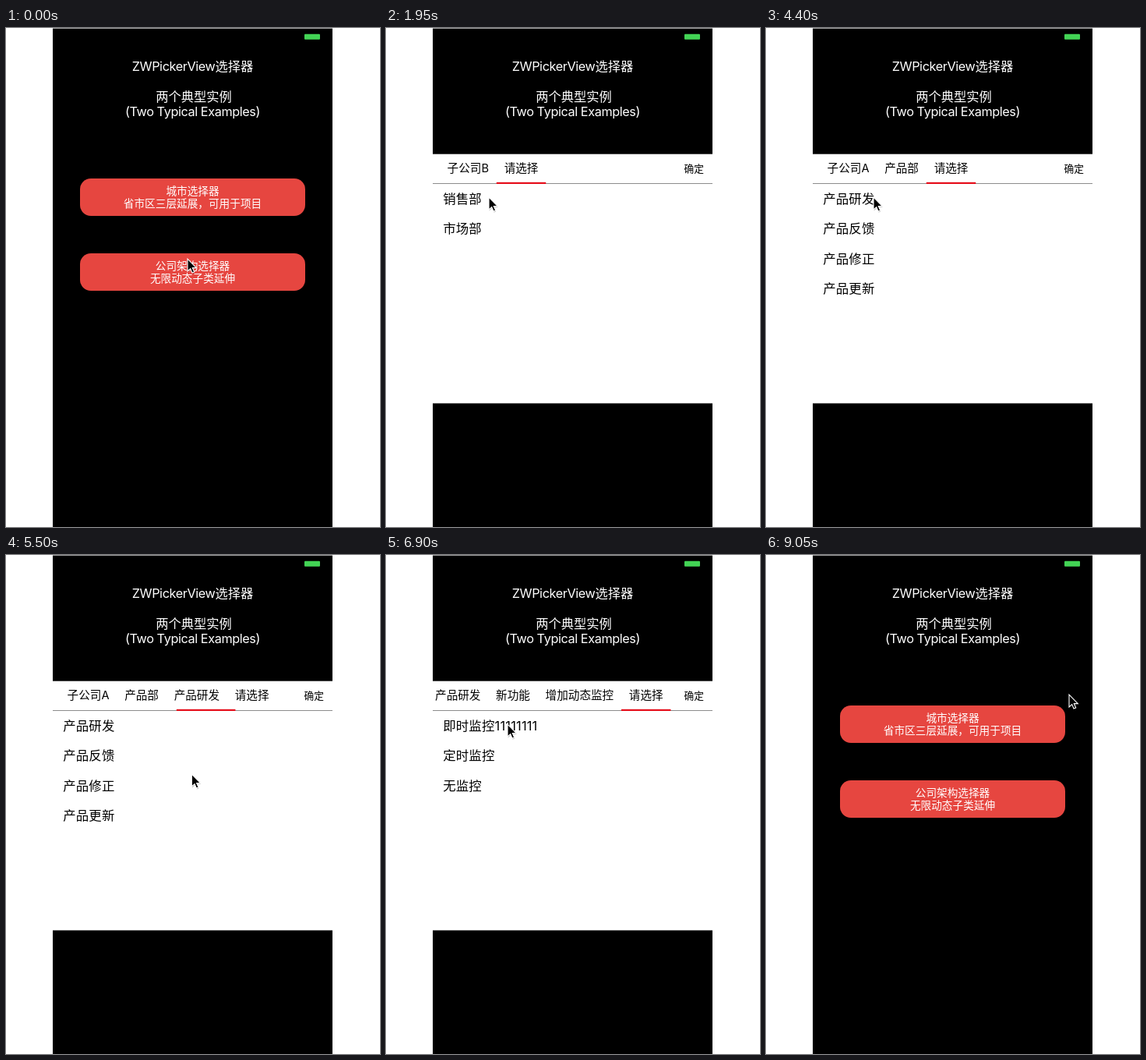
Recreate the animation shown at these times as an HTML page. Size 480x640 px, loop 9.1 s.

```html
<!DOCTYPE html>
<html lang="zh-CN">
<head>
<meta charset="utf-8">
<title>ZWPickerView选择器</title>
<style>
html, body { margin: 0; width: 100%; height: 100%; overflow: hidden; background: #fff; }
svg { display: block; width: 100vw; height: 100vh; }
text { font-family: Inter, "Noto Sans CJK SC", "Noto Sans CJK", sans-serif; white-space: pre; }
.title { font-size: 16.3px; fill: #fff; text-anchor: middle; }
.latin { letter-spacing: -.43px; }
.label { font-size: 13.65px; fill: #fff; text-anchor: middle; }
.tab { font-size: 14.6px; }
.row { font-size: 16.4px; letter-spacing: .2px; }
</style>
</head>
<body>
<svg viewBox="0 0 480 640">
  <defs>
    <clipPath id="screen"><rect x="60" y="0" width="359" height="640"/></clipPath>
    <clipPath id="bar"><rect x="60" y="161" width="312" height="40"/></clipPath>
  </defs>
  <rect width="480" height="640" fill="#fff"/>
  <g clip-path="url(#screen)">
    <rect x="60" width="359" height="640"/>
    <rect x="60" width="359" height="1" fill="#999"/>
    <rect x="383" y="7.8" width="20" height="7" rx="1" fill="#43d455"/>
    <text class="title" x="239.5" y="55"><tspan class="latin">ZWPickerView</tspan>选择器</text>
    <text class="title" x="241" y="94">两个典型实例</text>
    <text class="title latin" x="239.5" y="113">(Two Typical Examples)</text>
    <g fill="#e64640">
      <rect x="95" y="193" width="289" height="48" rx="14"/>
      <rect x="95" y="289" width="289" height="48" rx="14"/>
    </g>
    <text class="label" x="239.5" y="214">城市选择器</text>
    <text class="label" x="239.5" y="230">省市区三层延展，可用于项目</text>
    <text class="label" x="239.5" y="310">公司架构选择器</text>
    <text class="label" x="239.5" y="326">无限动态子类延伸</text>
    <g id="panel">
      <rect x="60" y="161.7" width="359" height="319.7" fill="#fff"/>
      <rect x="60" y="199" width="359" height="1" fill="#8c8c8c"/>
      <g clip-path="url(#bar)">
        <g id="tabs">
          <rect id="line" y="197.8" height="2.2" fill="#e60f1c"/>
        </g>
      </g>
      <text x="382.6" y="185" font-size="12.7">确定</text>
      <g id="rows"></g>
    </g>
  </g>
  <g id="cursor">
    <path d="M0 0V16L3.7 12.6 6 18 8.7 16.9 6.3 11.6H11.3Z" transform="translate(.6 1.4)" opacity=".25"/>
    <path d="M0 0V16L3.7 12.6 6 18 8.7 16.9 6.3 11.6H11.3Z" stroke="#fff" stroke-width="1.1"/>
  </g>
</svg>
<script>
const LOOP = 9100, MOVE = 250, SLIDE = 300, OPEN = 150, CLOSE = 8650;
const TAB_X = 78.6, TAB_GAP = 19.7, ROW_H = 38.35;
const $ = id => document.getElementById(id);
const clamp = v => Math.max(0, Math.min(1, v));
const ease = u => (1 - Math.cos(Math.PI * clamp(u))) / 2;
const mix = (a, b, p) => a + (b - a) * p;

const tree = {
  子公司A: {
    产品部: {
      产品研发: {
        新功能: {
          增加动态监控: { 即时监控11111111: null, 定时监控: null, 无监控: null },
          增加数据统计: null
        },
        新设计: null
      },
      产品反馈: null, 产品修正: null, 产品更新: null
    },
    设计部: null
  },
  子公司B: { 销售部: { 区域总监: null, 区域经理: null }, 市场部: null },
  子公司C: null
};

// What the user does: time, action, index
const script = [
  [800, 'hover', 0], [1250, 'row', 1], [2000, 'row', 0], [2500, 'row', 0],
  [2913, 'tab', 0], [3480, 'row', 0], [4000, 'row', 0], [4450, 'row', 0],
  [5318, 'tab', 2], [5780, 'row', 0], [6120, 'row', 0], [6480, 'row', 0],
  [7000, 'row', 0], [7782, 'tab', 3], [8120, 'row', 1]
];

const pen = document.createElement('canvas').getContext('2d');
pen.font = '14.6px Inter, "Noto Sans CJK SC", "Noto Sans CJK", sans-serif';

function layout(names) {
  let x = TAB_X;
  return names.map(name => {
    const tab = { name, x, w: pen.measureText(name).width + TAB_GAP };
    x += tab.w;
    return tab;
  });
}

const childrenOf = picks => picks.reduce((node, name) => node[name], tree);

// Run the script through the picker; collect its states and the pointer's stops
const states = [], stops = [];
let picks = [], level = 0, scroll = 0, tabs = layout(['请选择']);

function save(at) {
  const rows = Object.keys(childrenOf(picks.slice(0, level)));
  states.push({ at, tabs, rows, active: tabs[level], scroll });
}
function rest(from, to, x, y) {
  stops.push({ at: from, x, y }, { at: to, x, y });
}

save(0);
rest(0, OPEN + 140, 233, 296);
for (const [at, action, i] of script) {
  let x = 126 + 6 * level, y = 217 + ROW_H * i;
  if (action === 'row') {
    picks = [...picks.slice(0, level), states.at(-1).rows[i]];
    const open = childrenOf(picks);
    tabs = layout(open ? [...picks, '请选择'] : picks);
    if (open) level++;
    const fit = overflow();
    scroll = open ? fit : Math.min(scroll, fit);
  } else if (action === 'tab') {
    level = i;
    const tab = tabs[i];
    scroll = Math.min(overflow(), Math.max(0, tab.x - 161));
    x = mix(tab.x - scroll + (tab.w - TAB_GAP) / 2, 195, .13);
    y = 184;
  }
  if (action !== 'hover') save(at);
  rest(at - 100, at + 135, x, y);
  if (action === 'tab') stops.push({ at: at + 182, x, y: 281 });
}
rest(CLOSE - 70, LOOP, 389, 179);

function overflow() {
  const { x, w } = tabs.at(-1);
  return Math.max(0, x + w - TAB_GAP / 2 - 365.5 + TAB_GAP / 2 - TAB_GAP / 2);
}

function addText(parent, cls, y) {
  const el = document.createElementNS('http://www.w3.org/2000/svg', 'text');
  el.setAttribute('class', cls);
  el.setAttribute('y', y);
  $(parent).append(el);
  return el;
}
const tabEls = Array.from({ length: 6 }, () => addText('tabs', 'tab', 185.2));
const rowEls = Array.from({ length: 4 }, (_, i) => addText('rows', 'row', 225 + i * ROW_H));
rowEls.forEach(el => el.setAttribute('x', 73.2));

const moveTo = (id, x, y) => $(id).setAttribute('transform', `translate(${x} ${y})`);

let shown;
function fill(state) {
  if (shown === state) return;
  shown = state;
  tabEls.forEach((el, i) => {
    const tab = state.tabs[i];
    el.textContent = tab ? tab.name : '';
    el.setAttribute('x', tab ? tab.x : 0);
  });
  rowEls.forEach((el, i) => el.textContent = state.rows[i] || '');
}

function draw(t) {
  const n = states.findLastIndex(s => s.at <= t);
  const now = states[n], old = states[Math.max(0, n - 1)];
  const p = ease((t - now.at) / MOVE);
  fill(now);
  moveTo('tabs', -mix(old.scroll, now.scroll, p), 0);
  $('line').setAttribute('x', mix(old.active.x, now.active.x, p) - TAB_GAP / 2);
  $('line').setAttribute('width', mix(old.active.w, now.active.w, p));

  const open = ease((t - OPEN) / SLIDE) - ease((t - CLOSE) / SLIDE);
  moveTo('panel', 0, -482 * (1 - open));

  const k = stops.findIndex(s => s.at > t);
  const a = stops[k - 1], b = stops[k];
  const c = ease((t - a.at) / (b.at - a.at));
  moveTo('cursor', mix(a.x, b.x, c), mix(a.y, b.y, c));
}

const begin = performance.now();
function tick() {
  draw((performance.now() - begin) % LOOP);
  requestAnimationFrame(tick);
}
tick();
</script>
</body>
</html>
```
